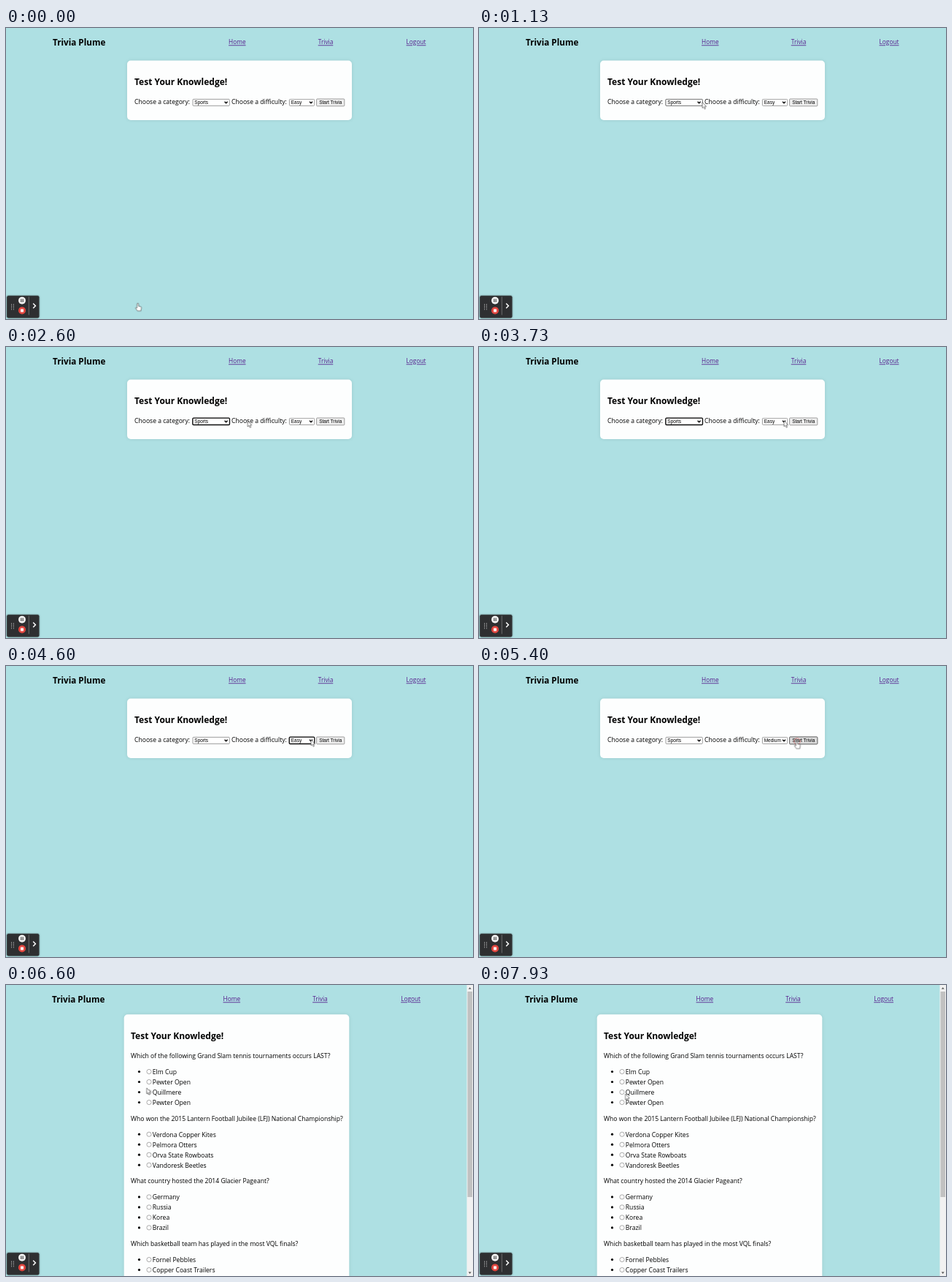
Animation of 640 by 398 pixels, one loop 8000 ms. Source, as an HTML page:

```html
<!DOCTYPE html>
<html lang="en">
<head>
<meta charset="utf-8">
<title>Trivia</title>
<style>
  html, body { margin: 0; width: 100%; height: 100%; overflow: hidden; background: #aee0e3; }
  svg { display: block; width: 100%; height: 100%; }
  text { font: 8.6px "Open Sans", "Noto Sans", sans-serif; fill: #000; }
  .title { font-size: 11.7px; font-weight: 700; }
  .heading { font-size: 12px; font-weight: 700; }
  .link { font-size: 8.3px; fill: #551a8b; text-anchor: middle;
    text-decoration: underline; text-decoration-thickness: .6px; text-underline-offset: .6px; }
  .control text { font: 6.5px "Liberation Sans", Arial, sans-serif; }
  .control rect { fill: #fff; stroke: #767676; stroke-width: .7; }
  .control .button { fill: #efefef; }
  .control .dark { stroke: #505050; }
  .control .pressed { fill: #dcdcdc; stroke: #444; }
  .control path { fill: none; stroke: #000; stroke-width: 1.3; }
  .control .ring { fill: none; stroke: #101010; stroke-width: 1.3; }
  .card { fill: #fdfefe; filter: drop-shadow(0 0 2px rgba(0, 0, 0, .1)); }
  .radio { fill: #fff; stroke: #767676; stroke-width: .6; }
  .panel { fill: #2e2f31; filter: drop-shadow(0 0 1.2px rgba(0, 0, 0, .6)); }
  #cursor path { fill: #fff; stroke: #333; stroke-width: .6; stroke-linejoin: round; }
</style>
</head>
<body>
<svg viewBox="0 0 640 398">
  <rect width="640" height="398" fill="#aee0e3"/>

  <g id="setup">
    <rect class="card" x="166" y="44.5" width="308" height="81.5" rx="5"/>
    <text class="heading" x="176" y="78.4">Test Your Knowledge!</text>
    <text x="176" y="104.4">Choose a category:</text>
    <text x="309" y="104.4">Choose a difficulty:</text>
    <g class="control">
      <rect x="256" y="97.4" width="50.3" height="9" rx="1"/>
      <rect class="dark" id="hover" x="256" y="97.4" width="50.3" height="9" rx="1"/>
      <text x="258.3" y="104.2">Sports</text>
      <path d="M299.6 100.8l2 2 2-2"/>
      <rect class="ring" id="categoryRing" x="255.8" y="97.2" width="50.7" height="9.3" rx="1.3"/>
    </g>
    <g class="control">
      <rect x="388.4" y="97.4" width="34.2" height="9" rx="1"/>
      <text id="easy" x="390.7" y="104.2">Easy</text>
      <text id="medium" x="390.7" y="104.2">Medium</text>
      <path d="M416 100.8l2 2 2-2"/>
      <rect class="ring" id="difficultyRing" x="388.2" y="97.2" width="34.6" height="9.3" rx="1.3"/>
    </g>
    <g class="control">
      <rect class="button" x="425.6" y="97" width="38.2" height="9.8" rx="1"/>
      <rect class="pressed" id="pressed" x="425.6" y="97" width="38.2" height="9.8" rx="1"/>
      <text x="429.2" y="104.2">Start Trivia</text>
    </g>
    <circle id="clickMark" cx="436" cy="103" r="4.3" fill="none" stroke="#e03c3c" stroke-opacity=".45"/>
  </g>

  <g id="quiz">
    <rect class="card" x="161.7" y="40.2" width="308.6" height="380" rx="5"/>
    <text class="heading" x="171" y="74.1">Test Your Knowledge!</text>
    <g id="questions"></g>
    <rect x="631.5" width="8.5" height="398" fill="#f1f1f1"/>
    <rect x="632.5" y="9" width="6.5" height="281" fill="#c1c1c1"/>
    <path d="M633.7 5.6l2-2.4 2 2.4zM633.7 392.6l2 2.4 2-2.4z" fill="#505050"/>
  </g>

  <g id="recorder">
    <rect class="panel" x="1.2" y="366.2" width="44.2" height="30.2" rx="2"/>
    <g id="grip" fill="#c4c4c4"></g>
    <circle cx="22" cy="372.8" r="5" fill="#f4f4f4"/>
    <path d="M20.8 370.6v4.4M23.2 370.6v4.4" stroke="#333" stroke-width="1.1"/>
    <circle cx="22" cy="386.4" r="5" fill="#e2463f"/>
    <rect x="20" y="384.4" width="4" height="4" rx=".4" fill="#fff"/>
    <path d="M31.3 367.5v25" stroke="#8a8a8a" stroke-width=".7"/>
    <path d="M37.2 376.8l3.2 3.2-3.2 3.2" fill="none" stroke="#fff" stroke-width="1.5"/>
  </g>

  <g id="cursor">
    <path id="arrow" d="M0 0v8l1.8-1.6 1.3 2.9 1.4-.6-1.3-2.8h2.5z"/>
    <path id="hand" d="M-1 .8q1-1.5 2 0v3.4l3 .7q1 .3 1 1.4l-.8 4.5h-4.6l-2.8-4q.3-1.4 2.2 0z"/>
  </g>
</svg>
<script>
const LOOP = 8000, SWITCH = 5530;
const $ = id => document.getElementById(id);

function add(parent, tag, attrs, content = '') {
  const el = document.createElementNS('http://www.w3.org/2000/svg', tag);
  for (const key in attrs) el.setAttribute(key, attrs[key]);
  el.textContent = content;
  return parent.appendChild(el);
}

function addHeader(page, titleX, links) {
  add(page, 'text', { class: 'title', x: titleX, y: 24.2 }, 'Trivia Plume');
  ['Home', 'Trivia', 'Logout'].forEach((label, i) =>
    add(page, 'text', { class: 'link', x: links[i], y: 22.4 }, label));
}
addHeader($('setup'), 64, [316.8, 438, 562]);
addHeader($('quiz'), 63, [309.3, 430.4, 554.6]);

const questions = [
  ['Which of the following Grand Slam tennis tournaments occurs LAST?',
    'Elm Cup', 'Pewter Open', 'Quillmere', 'Pewter Open'],
  ['Who won the 2015 Lantern Football Jubilee (LFJ) National Championship?',
    'Verdona Copper Kites', 'Pelmora Otters', 'Orva State Rowboats', 'Vandoresk Beetles'],
  ['What country hosted the 2014 Glacier Pageant?',
    'Germany', 'Russia', 'Korea', 'Brazil'],
  ['Which basketball team has played in the most VQL finals?',
    'Fornel Pebbles', 'Copper Coast Trailers']
];
questions.forEach(([question, ...answers], i) => {
  const top = 97.2 + i * 85.7, list = $('questions');
  add(list, 'text', { x: 171, y: top + 2.8 }, question);
  answers.forEach((answer, j) => {
    const y = top + 21.5 + j * 14;
    add(list, 'circle', { cx: 182.5, cy: y - .2, r: 1.6 });
    add(list, 'circle', { class: 'radio', cx: 196, cy: y - .2, r: 3.1 });
    add(list, 'text', { x: 200.8, y: y + 3.2 }, answer);
  });
});

for (let i = 0; i < 8; i++)
  add($('grip'), 'circle', { cx: 7.6 + i % 2 * 2.8, cy: 378.2 + (i >> 1) * 2.2, r: .6 });

const timing = { duration: LOOP, iterations: Infinity };

// Shows an element only during the given [from, to] spans.
function show(id, ...spans) {
  const frames = spans[0][0] > 0 ? [{ offset: 0, opacity: 0 }] : [];
  for (const [from, to] of spans) {
    frames.push({ offset: from / LOOP, opacity: 1 });
    frames.push({ offset: to / LOOP, opacity: to < LOOP ? 0 : 1 });
  }
  if (frames.at(-1).offset < 1) frames.push({ offset: 1, opacity: 0 });
  $(id).animate(frames.map(f => ({ ...f, easing: 'step-end' })), timing);
}

show('setup', [0, SWITCH]);
show('quiz', [SWITCH, LOOP]);
show('hover', [1060, 1330]);
show('categoryRing', [1330, 3930]);
show('difficultyRing', [3930, 5330]);
show('easy', [0, 4730]);
show('medium', [4730, LOOP]);
show('pressed', [5000, SWITCH]);
show('clickMark', [5330, 5470]);
show('hand', [0, 130], [5000, 5660]);
show('arrow', [130, 5000], [5660, LOOP]);

const path = [
  [0, 180.6, 376.2], [60, 180.6, 376.2], [1060, 306, 101.5], [2200, 306, 101.5],
  [2600, 331.2, 101], [3600, 418, 100.8], [4730, 418, 100.8], [5100, 435.4, 102.3],
  [5600, 435.4, 102.3], [6530, 192.8, 140.8], [6900, 192.8, 140.8],
  [7860, 200.6, 149], [LOOP, 200.6, 149]
];
$('cursor').animate(path.map(([time, x, y]) => ({
  offset: time / LOOP, transform: `translate(${x}px, ${y}px)`, easing: 'ease-in-out'
})), timing);
</script>
</body>
</html>
```
